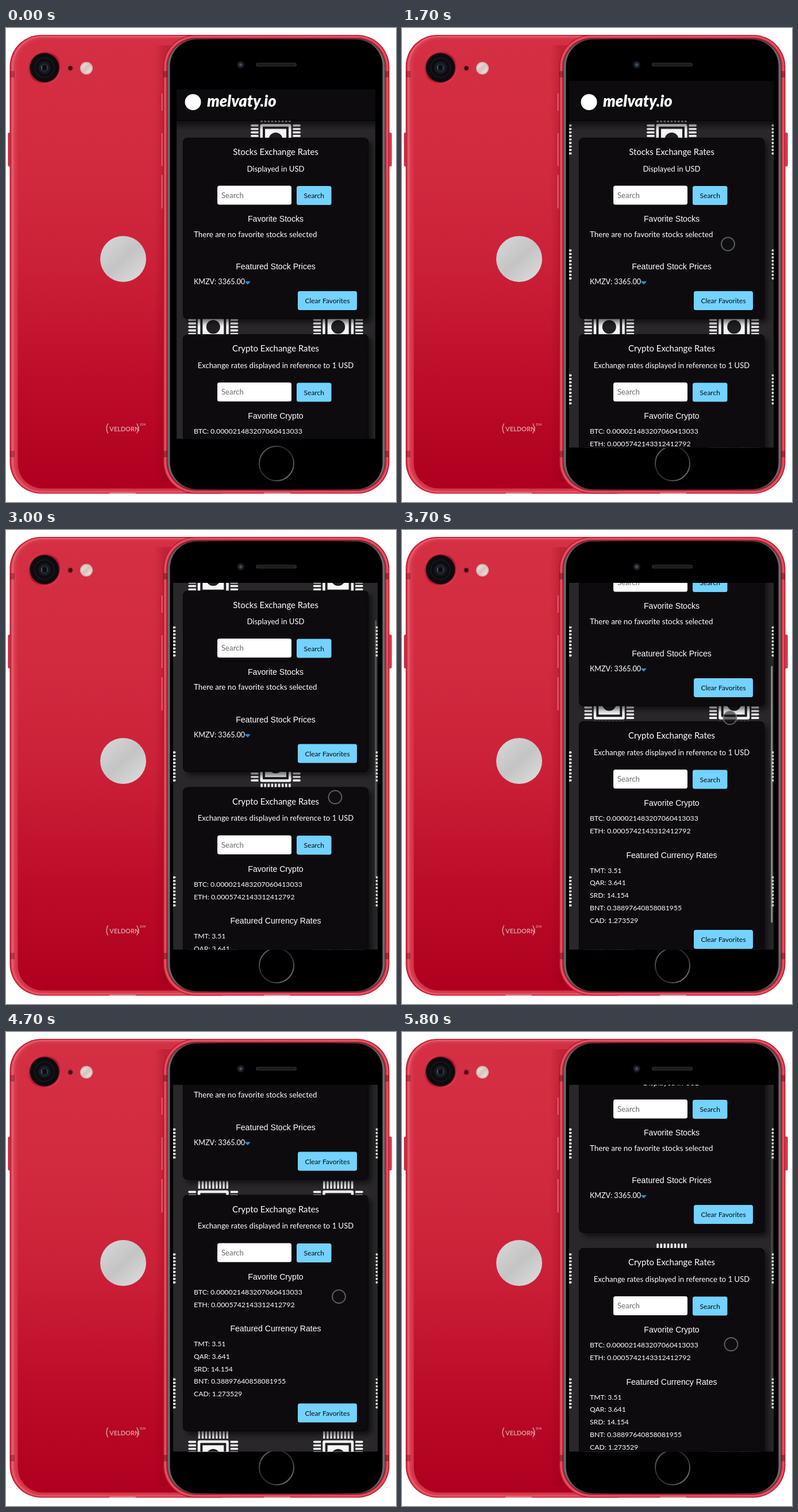
Animation of 679x825 px, one loop 5900 ms. Source, as an HTML page with a canvas:

```html
<!DOCTYPE html>
<html lang="en">
<head>
<meta charset="utf-8">
<title>Exchange rates on a phone</title>
<style>
html, body { margin: 0; width: 100%; height: 100%; overflow: hidden; background: #fff; }
canvas { display: block; width: 679px; height: 825px; }
</style>
</head>
<body>
<canvas id="stage"></canvas>
<script>
const W = 679, H = 825, LOOP = 5900, STEP = 100;
const canvas = document.getElementById('stage');
const ctx = canvas.getContext('2d');
const dpr = window.devicePixelRatio || 1;
canvas.width = W * dpr;
canvas.height = H * dpr;

const MID = 469.5;
const SANS = 'Lato, sans-serif';
const HEAD = '"Liberation Sans", Arial, sans-serif';
const SCREEN = { x: 291, y: 92, w: 356, h: 638.5 };
const PITCH = 217.5;

// [time, value] pairs
const SCROLL = [[1800, 0], [2400, 73], [2700, 85.5], [3100, 85.5], [3700, 200],
  [4200, 249.5], [4800, 249.5], [5300, 157]];
const TOUCH_X = [[1700, 567.5], [2400, 570], [3000, 573], [3700, 571], [4700, 579.5], [5400, 573]];
const TOUCH_Y = [[1800, 376], [2400, 294], [2500, 294], [3000, 465], [3100, 465], [3700, 327],
  [3900, 327], [4700, 460.5], [4800, 460.5], [5400, 543.5]];
const BAR = [[1800, 0], [1900, .8], [2700, .8], [3000, .35], [3100, .8], [4200, .8],
  [4600, 0], [4800, 0], [4900, .8], [5400, .8], [5800, .25]];

function at(keys, t) {
  if (t <= keys[0][0]) return keys[0][1];
  for (let i = 1; i < keys.length; i++) {
    const [t1, b] = keys[i], [t0, a] = keys[i - 1];
    if (t <= t1) {
      const u = (t - t0) / (t1 - t0);
      return a + (b - a) * u * u * (3 - 2 * u);
    }
  }
  return keys[keys.length - 1][1];
}

function box(x, y, w, h, r, fill) {
  ctx.beginPath();
  ctx.roundRect(x, y, w, h, r);
  ctx.fillStyle = fill;
  ctx.fill();
}

function disc(x, y, r, fill) {
  ctx.beginPath();
  ctx.arc(x, y, r, 0, Math.PI * 2);
  ctx.fillStyle = fill;
  ctx.fill();
}

function ring(x, y, r, width, color) {
  ctx.beginPath();
  ctx.arc(x, y, r, 0, Math.PI * 2);
  ctx.lineWidth = width;
  ctx.strokeStyle = color;
  ctx.stroke();
}

function ramp(x0, y0, x1, y1, ...colors) {
  const g = ctx.createLinearGradient(x0, y0, x1, y1);
  colors.forEach((c, i) => g.addColorStop(i / (colors.length - 1), c));
  return g;
}

function label(str, x, y, size, color = '#fff', align = 'left', family = SANS, style = '') {
  ctx.font = `${style} ${size}px ${family}`;
  ctx.fillStyle = color;
  ctx.textAlign = align;
  ctx.fillText(str, x, y);
}

const center = (str, y, size, family) => label(str, MID, y, size, '#fff', 'center', family);

// nested outlines: [side inset, top inset, fill]
function shell(x, y, w, h, r, layers) {
  for (const [dx, dy, fill] of layers) {
    box(x + dx, y + dy, w - 2 * dx, h - 2 * dy, r - (dx + dy) / 2, fill);
  }
}

function sideKey(x, y, h) {
  box(x, y, 7, h, 2.5, ramp(x, 0, x + 7, 0, '#a80f25', '#e85467', '#b3162c'));
}

function drawBack() {
  sideKey(3.5, 182, 59);
  shell(6.5, 12, 420, 798.5, 55, [
    [0, 0, '#b5172d'],
    [1.5, 1, '#d5384b'],
    [3.5, 2, '#e75a6a'],
    [6.5, 4, '#db3f52'],
    [10, 6, '#d3344a'],
    [14, 9, ramp(0, 22, 0, 800, '#d52f43', '#d22b40', '#cb2138', '#bd0d2a', '#af001f')],
  ]);
  for (const y of [75, 736]) box(7, y, 8, 11, 0, 'rgba(110,10,28,.4)');
  box(180, 809, 46, 2, 1, '#d7a4a8');
  box(258, 30, 40, 760, 0, ramp(258, 0, 276, 0, 'rgba(130,0,20,0)', 'rgba(130,0,20,.25)'));

  // camera, microphone, flash
  disc(67, 69, 29, ramp(45, 45, 90, 95, '#d8404f', '#b5182f', '#e2485a'));
  disc(67, 69, 26.8, '#9a142a');
  disc(67, 69, 25.2, '#0c0b0e');
  ring(67, 69, 17, 1.5, '#1a1b20');
  disc(67, 69, 11, '#17191f');
  disc(67, 69, 7.5, '#20252f');
  disc(67, 69, 4.5, '#0b0d14');
  box(61.5, 65.5, 1.5, 7, .7, '#566274');
  box(71, 65.5, 1.5, 7, .7, '#3a4452');
  disc(112, 70, 4.5, '#8d1426');
  disc(112, 70, 3.2, '#2a0b10');
  disc(140, 70, 11, '#d9b5b1');
  disc(140, 70, 9, ramp(132, 62, 148, 78, '#eee6df', '#d4c3bc', '#f1eae4'));

  disc(204, 402, 40, ramp(170, 365, 238, 440, '#d6d6d6', '#c4c4c5', '#dcdcdc'));

  const pale = '#d79a9b';
  label('(', 173.5, 703, 20, pale);
  label('VELDORN', 180, 701.5, 11, pale, 'left', SANS, 'bold');
  label(')', 226.5, 703, 20, pale);
  label('ZUN', 233, 692, 4.8, pale, 'left', SANS, 'bold');
}

function drawFront() {
  for (const [y, h] of [[114, 30], [183, 57], [256, 58]]) sideKey(268, y, h);
  sideKey(664.5, 182, 59);
  shell(273.5, 12, 394, 798.5, 56, [
    [0, 0, '#b3152b'],
    [1.5, 1, '#dc4154'],
    [3, 2.5, '#e55566'],
    [5, 4.5, '#c32a3f'],
    [7, 6, '#7d1122'],
    [8, 7, ramp(281, 0, 659, 0, '#6c6c6c', '#1c1c1c', '#141414', '#1c1c1c', '#6c6c6c')],
    [12, 8, '#000'],
  ]);
  for (const y of [75, 736]) {
    box(274, y, 7, 11, 0, 'rgba(90,10,25,.45)');
    box(660, y, 7, 11, 0, 'rgba(90,10,25,.45)');
  }
  box(449, 809, 46, 2, 1, '#d7a4a8');

  disc(408.5, 64, 6.5, '#16181d');
  disc(408.5, 64, 4, '#252d3a');
  disc(408.5, 64, 2, '#4b5666');
  box(435, 60.5, 71, 6.5, 3.2, '#29292b');
  box(437, 62, 67, 3.5, 1.7, '#1b1b1d');
  ring(471, 758, 30, 2, ramp(445, 735, 497, 782, '#6a6a6a', '#2a2a2a', '#333', '#7c7c7c'));
}

function drawChip(cx, cy) {
  ctx.save();
  ctx.translate(cx, cy);
  for (let i = -4; i <= 4; i++) {
    const p = i * 6.1 - 1.8;
    box(p, -43.5, 3.6, 87, 1.8, '#f1f0f2');
    box(-43.5, p, 87, 3.6, 1.8, '#f1f0f2');
  }
  box(-30, -30, 60, 60, 4, '#29272a');
  box(-27, -27, 54, 54, 3, '#f6f5f7');
  box(-22.5, -22.5, 45, 45, 1, '#201e21');
  box(-18.5, -18.5, 37, 37, 0, '#f6f5f7');
  disc(0, 0, 12, '#201e21');
  ctx.restore();
}

function drawPattern() {
  ctx.fillStyle = '#29272a';
  ctx.fillRect(SCREEN.x, SCREEN.y, SCREEN.w, SCREEN.h);
  for (let col = -2; col <= 2; col++) {
    const shift = col % 2 ? -PITCH / 2 : 0;
    for (let row = 0; row < 4; row++) drawChip(MID + col * PITCH / 2, 194 + shift + row * PITCH);
  }
}

function panel(y, h) {
  ctx.save();
  ctx.shadowColor = 'rgba(0,0,0,.6)';
  ctx.shadowBlur = 10 * dpr;
  ctx.shadowOffsetX = 6 * dpr;
  ctx.shadowOffsetY = 6 * dpr;
  box(308, y, 323, h, 8, '#060507');
  ctx.restore();
  box(309, y + 1, 321, h - 2, 7, '#0d0b0e');
}

function button(str, x, y, w) {
  box(x, y, w, 33, 3.5, '#73d2ff');
  label(str, x + w / 2, y + 21, 12, '#0d0b0e', 'center');
}

function searchRow(y) {
  box(368, y, 129, 33, 3.5, '#fff');
  label('Search', 375, y + 21, 13.2, '#6c6c70');
  button('Search', 506, y + .5, 60.5);
}

function drawPage() {
  ctx.fillStyle = ramp(0, 161, 0, 178, 'rgba(0,0,0,.65)', 'rgba(0,0,0,0)');
  ctx.fillRect(291, 161, 356, 17);
  box(291, 60, 356, 101, 0, '#0d0b0e');
  box(291, 160, 356, 1, 0, '#000');
  disc(325.5, 129, 14, '#fff');
  label('melvaty.io', 350, 137, 27.3, '#fff', 'left', SANS, 'italic 900');

  panel(191, 315.5);
  center('Stocks Exchange Rates', 221, 14.9);
  center('Displayed in USD', 249.5, 13.1);
  searchRow(274.5);
  center('Favorite Stocks', 337, 14.1, HEAD);
  label('There are no favorite stocks selected', 327, 363.5, 13.3);
  center('Featured Stock Prices', 420, 14.1, HEAD);
  label('KMZV: 3365.00', 327, 446, 12.6);
  ctx.beginPath();
  ctx.moveTo(416.5, 441.5);
  ctx.lineTo(425, 441.5);
  ctx.lineTo(420.8, 446);
  ctx.closePath();
  ctx.lineJoin = 'round';
  ctx.lineWidth = 1;
  ctx.fillStyle = ctx.strokeStyle = '#2592e0';
  ctx.fill();
  ctx.stroke();
  button('Clear Favorites', 508, 458, 103);

  panel(533, 411.5);
  center('Crypto Exchange Rates', 563, 14.9);
  center('Exchange rates displayed in reference to 1 USD', 591.5, 13.1);
  searchRow(617);
  center('Favorite Crypto', 680, 14.1, HEAD);
  label('BTC: 0.000021483207060413033', 327, 706, 12.3);
  label('ETH: 0.0005742143312412792', 327, 728, 12.3);
  center('Featured Currency Rates', 770.5, 14.1, HEAD);
  ['TMT: 3.51', 'QAR: 3.641', 'SRD: 14.154', 'BNT: 0.38897640858081955', 'CAD: 1.273529']
    .forEach((row, i) => label(row, 327, 796.5 + i * 21.75, 12.2));
  button('Clear Favorites', 508, 896, 103);
}

function drawScreen(t) {
  const scroll = at(SCROLL, t);
  ctx.save();
  ctx.beginPath();
  if (t < STEP) ctx.rect(297, 107, 346, 608);
  else ctx.rect(SCREEN.x, SCREEN.y, SCREEN.w, SCREEN.h);
  ctx.clip();
  drawPattern();
  ctx.save();
  ctx.translate(0, -scroll);
  drawPage();
  ctx.restore();
  box(642.3, 98 + scroll * .693, 3, 447, 1.5, `rgba(165,165,165,${at(BAR, t)})`);
  if (t >= 1200) {
    const x = at(TOUCH_X, t), y = at(TOUCH_Y, t);
    disc(x, y, 11.5, 'rgba(16,15,17,.6)');
    ring(x, y, 11.5, 2, 'rgba(112,112,112,.8)');
  }
  ctx.restore();
}

function frame(now) {
  const t = Math.floor(Math.max(0, now - start) % LOOP / STEP) * STEP;
  ctx.setTransform(dpr, 0, 0, dpr, 0, 0);
  ctx.fillStyle = '#fff';
  ctx.fillRect(0, 0, W, H);
  drawBack();
  drawFront();
  drawScreen(t);
  requestAnimationFrame(frame);
}

const start = performance.now();
frame(start);
</script>
</body>
</html>
```
